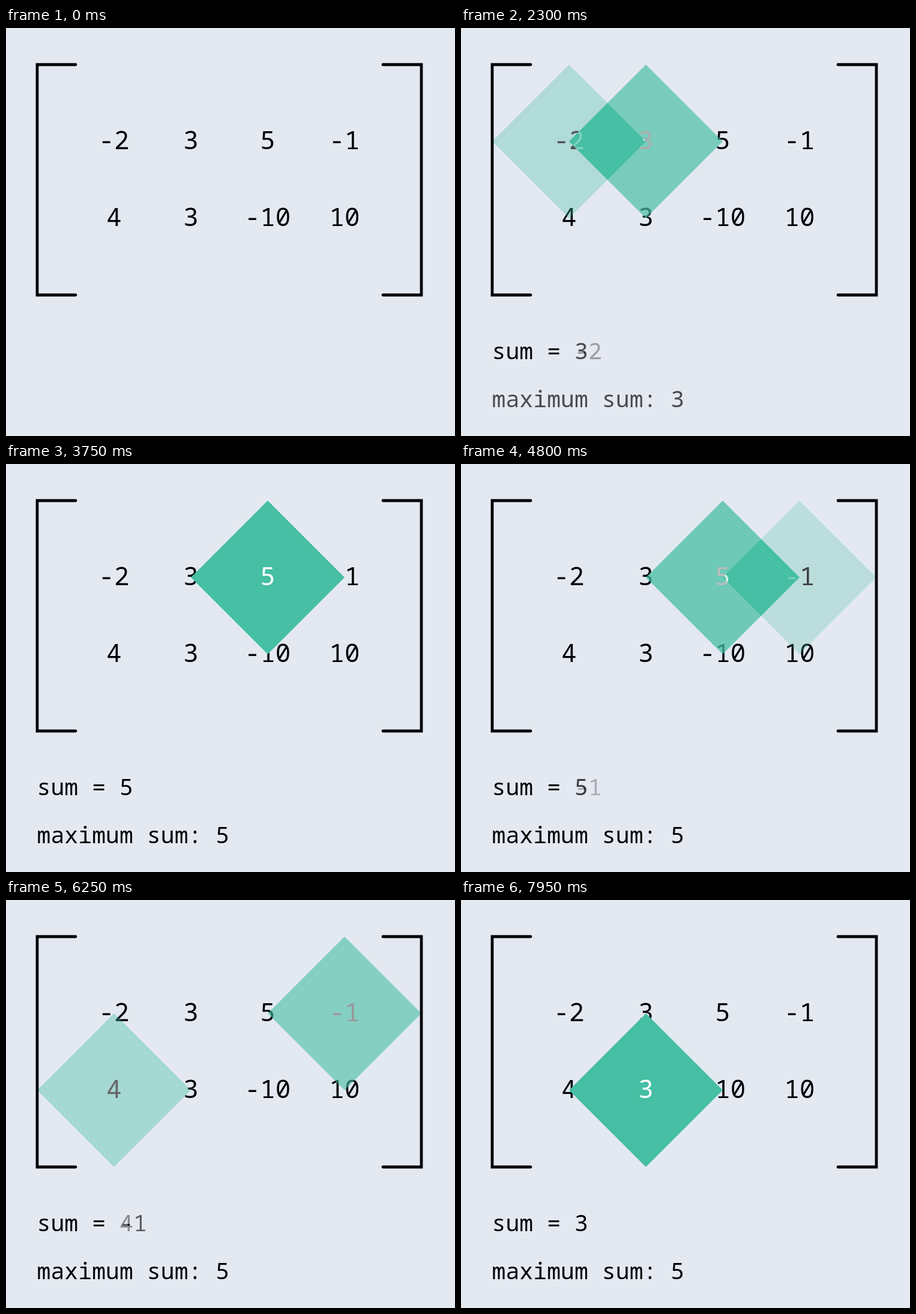
These frames come from a looping animation (748 by 680 pixels, 8 s). An HTML page with a canvas:

```html
<!DOCTYPE html>
<html lang="en">
<head>
<meta charset="utf-8">
<title>Diamond sums</title>
<style>
  html, body { margin: 0; width: 100%; height: 100%; overflow: hidden; background: #e4e9f1; }
  canvas { display: block; }
</style>
</head>
<body>
<canvas id="stage" width="748" height="680"></canvas>
<script>
const W = 748, H = 680, LOOP = 8000, TICK = 50, FADE = 430;
const PAPER = '#e4e9f1', INK = '#000005', GREEN = '#46bfa4';
const MONO = '"Noto Sans Mono", "DejaVu Sans Mono", monospace';
const CELL = 128;
const GRID = [[-2, 3, 5, -1], [4, 3, -10, 10]];

// Each step fades in at its start time; cell is [row, column].
const STEPS = [
  { start: -FADE },
  { start: 910, cell: [0, 0] },
  { start: 2010, cell: [0, 1], max: 3 },
  { start: 3285, cell: [0, 2], max: 5 },
  { start: 4690, cell: [0, 3], max: 5 },
  { start: 6080, cell: [1, 0], max: 5 },
  { start: 7400, cell: [1, 1], max: 5 }
];

const ctx = document.getElementById('stage').getContext('2d');
const layer = document.createElement('canvas');
layer.width = W;
layer.height = H;
const layerCtx = layer.getContext('2d');

const colX = c => 180 + c * CELL;
const rowY = r => 189 + r * CELL;

function drawNumber(g, r, c, color) {
  g.font = '42.5px ' + MONO;
  g.textAlign = 'center';
  g.fillStyle = color;
  g.fillText(String(GRID[r][c]), colX(c), rowY(r) + 13);
}

function drawDiamond(g, x, y) {
  g.fillStyle = GREEN;
  g.beginPath();
  g.moveTo(x, y - CELL);
  g.lineTo(x + CELL, y);
  g.lineTo(x, y + CELL);
  g.lineTo(x - CELL, y);
  g.closePath();
  g.fill();
}

function drawBracket(g, x, dir) {
  g.beginPath();
  g.moveTo(x + dir * 64, 61);
  g.lineTo(x, 61);
  g.lineTo(x, 445);
  g.lineTo(x + dir * 64, 445);
  g.stroke();
}

function drawLabel(g, text, y) {
  g.font = '38.2px ' + MONO;
  g.textAlign = 'left';
  g.fillStyle = INK;
  g.fillText(text, 51.5, y);
}

function drawScene(g, step) {
  g.fillStyle = PAPER;
  g.fillRect(0, 0, W, H);
  GRID.forEach((row, r) => row.forEach((_, c) => drawNumber(g, r, c, INK)));

  if (step.cell) {
    const [r, c] = step.cell;
    drawDiamond(g, colX(c), rowY(r));
    drawNumber(g, r, c, '#fff');
    drawLabel(g, 'sum = ' + GRID[r][c], 552);
  }
  if (step.max !== undefined) drawLabel(g, 'maximum sum: ' + step.max, 632);

  g.strokeStyle = INK;
  g.lineWidth = 4.8;
  g.lineCap = 'round';
  g.lineJoin = 'miter';
  drawBracket(g, 52, 1);
  drawBracket(g, 692, -1);
}

function render(t) {
  let i = STEPS.length - 1;
  while (i > 0 && t < STEPS[i].start) i--;
  const mix = Math.min(1, (t - STEPS[i].start) / FADE);

  if (mix >= 1) {
    drawScene(ctx, STEPS[i]);
    return;
  }
  drawScene(ctx, STEPS[i - 1]);
  drawScene(layerCtx, STEPS[i]);
  ctx.globalAlpha = mix;
  ctx.drawImage(layer, 0, 0);
  ctx.globalAlpha = 1;
}

const begin = performance.now();
function frame() {
  const t = (performance.now() - begin) % LOOP;
  render(Math.floor(t / TICK) * TICK);
  requestAnimationFrame(frame);
}
frame();
</script>
</body>
</html>
```
